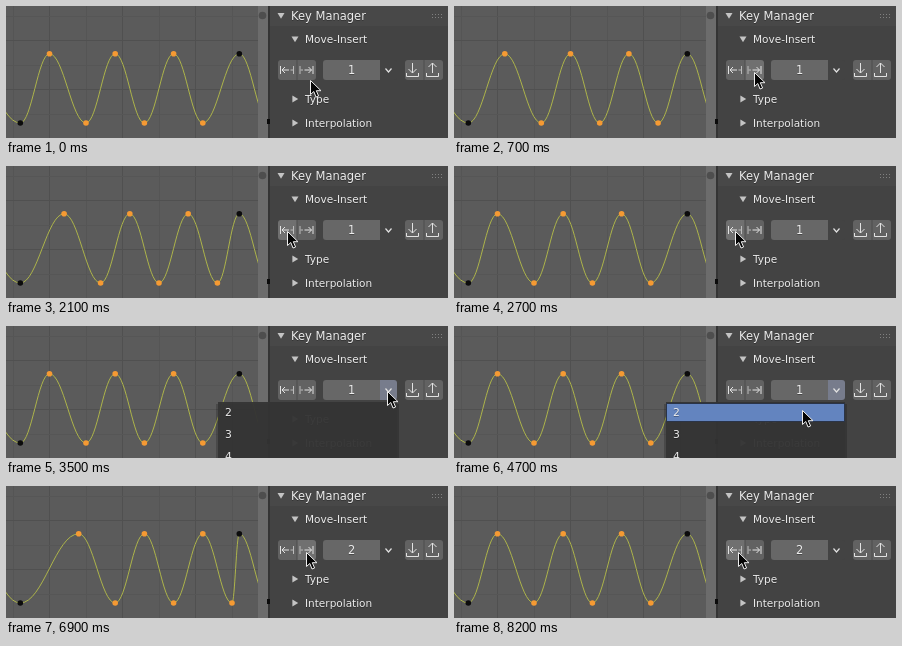
Recreate the animation shown at these times as an HTML page with a canvas. Size 442 by 132 pixels, loop 8.8 s.

```html
<!DOCTYPE html>
<html lang="en">
<head>
<meta charset="utf-8">
<title>Moving keys along a curve</title>
<style>
html, body { margin: 0; width: 100%; height: 100%; overflow: hidden; background: #444; }
canvas { display: block; }
</style>
</head>
<body>
<canvas id="stage" width="442" height="132"></canvas>
<script>
const ctx = document.getElementById('stage').getContext('2d');
const LOOP = 8800, STEP = 100;
const GRAPH_WIDTH = 252, FRAME = 7.3, FIRST_KEY = 14.3;
const BUTTON = '#626262', HOVER = '#707070', ICON = '#e2e2e2';

// All times count steps of 100 ms.
const MENU_OPENS = 35, MENU_CLOSES = 48;
const amountAt = step => step < MENU_CLOSES ? 1 : 2;

const clicks = [
  { direction: 1, times: [7, 10, 14, 65, 68] },
  { direction: -1, times: [20, 24, 27, 77, 82] },
];

const moves = [
  { from: 1, to: 5, x: 300, y: 66 },
  { from: 14, to: 18, x: 281, y: 65 },
  { from: 28, to: 34, x: 381, y: 65 },
  { from: 38, to: 45, x: 348, y: 84 },
  { from: 54, to: 61, x: 300, y: 66 },
  { from: 69, to: 73, x: 284, y: 66 },
];

function shiftAt(step) {
  let shift = 0;
  for (const { direction, times } of clicks)
    for (const time of times) if (time <= step) shift += direction * amountAt(time);
  return shift;
}

const isPressed = step => clicks.some(({ times }) => times.includes(step + 1));

function cursorAt(step) {
  let x = 304, y = 74;
  for (const move of moves) {
    const u = Math.min(1, Math.max(0, (step - move.from) / (move.to - move.from)));
    const eased = u * u * (3 - 2 * u);
    x += (move.x - x) * eased;
    y += (move.y - y) * eased;
  }
  return { x, y };
}

function hoverAt({ x, y }) {
  if (y < 54 || y >= 74) return '';
  if (x >= 374) return 'menu';
  return x < 291 ? 'left' : 'right';
}

function rect(x, y, w, h, color, radii = 0) {
  ctx.fillStyle = color;
  ctx.beginPath();
  ctx.roundRect(x, y, w, h, radii);
  ctx.fill();
}

function dot(x, y, r, color) {
  ctx.fillStyle = color;
  ctx.beginPath();
  ctx.arc(x, y, r, 0, 2 * Math.PI);
  ctx.fill();
}

function stroke(path, color, width = 1) {
  ctx.strokeStyle = color;
  ctx.lineWidth = width;
  ctx.stroke(new Path2D(path));
}

function at(x, y, paint) {
  ctx.save();
  ctx.translate(x, y);
  paint();
  ctx.restore();
}

function text(label, x, y, size = 10.5) {
  ctx.font = `${size}px "DejaVu Sans", sans-serif`;
  ctx.fillStyle = 'rgba(0,0,0,.3)';
  ctx.fillText(label, x, y + 1);
  ctx.fillStyle = '#ececec';
  ctx.fillText(label, x, y);
}

// Heights alternate between valleys and peaks; keys 4 to 25 are selected.
function curveKeys(shift) {
  return [-7.5, 0, 4, 9, 13, 17, 21, 25, 30, 34.1].map((frame, i) => {
    const selected = frame >= 4 && frame <= 25;
    return {
      x: FIRST_KEY + (frame + (selected ? shift : 0)) * FRAME,
      y: i % 2 ? 117 : 47.8,
      selected,
    };
  });
}

function drawGraph(shift) {
  rect(0, 0, GRAPH_WIDTH, 132, '#5b5b5b');
  for (let i = 0; i < 7; i++) rect(Math.round(6.7 + i * 5 * FRAME), 0, 1, 132, i % 2 ? '#505050' : '#555');
  for (let i = 0; i < 5; i++) rect(0, Math.round(10 + i * 24.4), GRAPH_WIDTH, 1, i % 2 ? '#505050' : '#565656');

  const keys = curveKeys(shift);
  ctx.strokeStyle = '#adb44a';
  ctx.lineWidth = 1;
  ctx.beginPath();
  ctx.moveTo(keys[0].x, keys[0].y);
  for (let i = 1; i < keys.length; i++) {
    const a = keys[i - 1], b = keys[i], handle = (b.x - a.x) * 0.39;
    ctx.bezierCurveTo(a.x + handle, a.y, b.x - handle, b.y, b.x, b.y);
  }
  ctx.stroke();
  for (const { x, y, selected } of keys) dot(x, y, 2.8, selected ? '#f59a33' : '#0c0c0c');

  rect(GRAPH_WIDTH, 0, 10, 132, '#6c6c6c');
  dot(256.5, 9.5, 3.8, '#4e4e4e');
}

function drawTriangle(x, y, open) {
  at(x, y, () => {
    if (!open) ctx.rotate(-Math.PI / 2);
    ctx.fillStyle = '#c4c4c4';
    ctx.fill(new Path2D('M-3.5-2.6H3.5L0 3.2Z'));
  });
}

function drawMoveIcon(x, direction) {
  at(x, 64, () => {
    ctx.scale(direction, 1);
    stroke('M6.5-4V4M-2 0H5M2-3L5 0L2 3', ICON);
    stroke('M-6.5-4V4M-6 0H-3.5', '#bbb');
  });
}

function drawTrayIcon(x, direction) {
  at(x, 62, () => {
    stroke('M-6 5V8.5H6V5', ICON);
    ctx.scale(1, direction);
    stroke('M0-5V5M-4 1L0 5L4 1', ICON);
  });
}

function drawButtonPair(x, width, leftColor, rightColor) {
  rect(x, 54, width / 2, 20, leftColor, [3, 0, 0, 3]);
  rect(x + width / 2, 54, width / 2, 20, rightColor, [0, 3, 3, 0]);
  rect(x + width / 2 - 0.5, 54, 1, 20, '#4c4c4c');
}

function drawPanel(amount, hover, pressed, open) {
  rect(262, 0, 180, 132, '#343434');
  rect(264, 0, 178, 20, '#484848');
  rect(264, 20, 178, 112, '#434343');
  rect(261, 113, 3, 5, '#0b0b0b');
  for (let i = 0; i < 8; i++) rect(426 + (i % 4) * 3, i < 4 ? 8 : 11, 1, 1, '#808080');

  drawTriangle(275, 9.5, true);
  text('Key Manager', 285, 14, 11.5);
  drawTriangle(289, 33, true);
  text('Move-Insert', 299, 37);
  ['Type', 'Interpolation'].forEach((label, i) => {
    drawTriangle(289, 93 + i * 24);
    text(label, 299, 97 + i * 24);
  });

  const color = name => hover !== name ? BUTTON : pressed ? '#5f84c4' : HOVER;
  drawButtonPair(272, 38, color('left'), color('right'));
  drawMoveIcon(281, -1);
  drawMoveIcon(300.5, 1);

  rect(317, 54, 57, 20, '#676767', [3, 0, 0, 3]);
  text(amount, 342, 67.5, 11.4);
  rect(374, 54, 17, 20, open ? '#777c8c' : hover === 'menu' ? '#555' : '#434343', [0, 3, 3, 0]);
  stroke('M379.5 62.5L382.5 66L385.5 62.5', ICON, 1.2);

  drawButtonPair(399, 38, BUTTON, BUTTON);
  drawTrayIcon(406.5, 1);
  drawTrayIcon(426.5, -1);
}

function drawMenu(highlight) {
  rect(210, 78, 183, 54, 'rgba(0,0,0,.2)');
  rect(212, 76, 179, 56, 'rgba(52,52,52,.95)');
  if (highlight) {
    rect(212, 77, 179, 19, '#2a3448');
    rect(213, 78, 177, 17, '#6384bf');
  }
  for (let i = 0; i < 3; i++) text(i + 2, 219, 90 + i * 22, 10.8);
}

function drawCursor({ x, y }) {
  at(x, y, () => {
    const arrow = 'M.5 .5V14.5L3.8 11.5L6 17L8.6 16L6.3 10.7H11Z';
    ctx.fillStyle = '#050505';
    ctx.fill(new Path2D(arrow));
    stroke(arrow, '#eee');
  });
}

function draw() {
  const step = Math.floor(performance.now() % LOOP / STEP);
  const cursor = cursorAt(step);
  const open = step >= MENU_OPENS && step < MENU_CLOSES;
  drawGraph(shiftAt(step));
  drawPanel(amountAt(step), hoverAt(cursor), isPressed(step), open);
  if (open) drawMenu(cursor.y > 76);
  drawCursor(cursor);
  requestAnimationFrame(draw);
}
draw();
</script>
</body>
</html>
```
